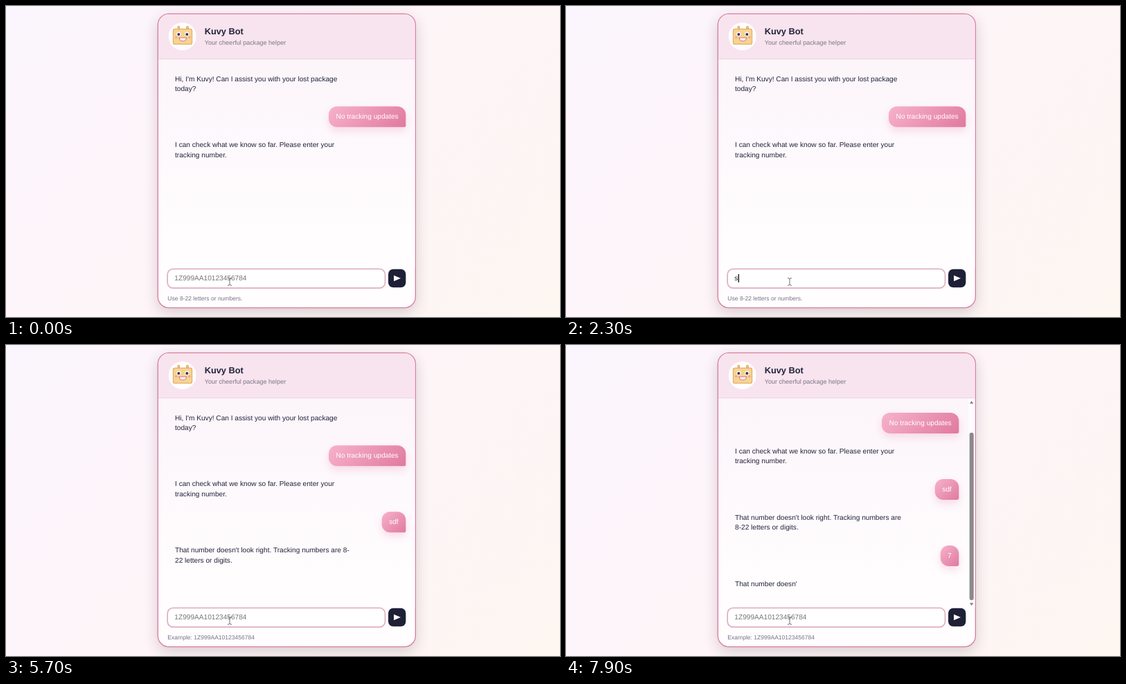
These frames come from a looping animation (800x450 px, 8000 ms). An HTML page:

```html
<!DOCTYPE html>
<html lang="en">
<head>
<meta charset="utf-8">
<title>Package chat</title>
<style>
  html, body { margin: 0; width: 100%; height: 100%; overflow: hidden; }
  body { background: linear-gradient(135deg, #fbf5fd 0%, #fef5f8 50%, #fdf6f1 100%); }
  * { box-sizing: border-box; }

  /* Laid out at 1200 x 675, shown at two thirds. */
  .stage {
    position: absolute; left: 0; top: 0; width: 1200px; height: 675px; overflow: hidden;
    transform: scale(.666667); transform-origin: 0 0;
    font: 15.2px/1.4 "Liberation Sans", Arial, sans-serif;
    color: #23243c; text-rendering: geometricPrecision;
  }
  .card {
    position: absolute; left: 328px; top: 15.6px; width: 560px; height: 640px;
    border: 2px solid #d87f9f; border-radius: 25px; overflow: hidden; background: #fffdfe;
    box-shadow: 0 10px 30px rgba(70, 40, 60, .2);
  }
  .card > * { position: absolute; }

  .head { left: 0; top: 0; width: 100%; height: 98px; background: #f8e4ee; border-bottom: 2px solid #efd3e0; }
  .head > * { position: absolute; }
  .face { left: 22px; top: 18px; width: 60px; height: 60px; }
  .name { left: 100px; top: 25px; font-size: 19.2px; line-height: 27px; font-weight: bold; }
  .role { left: 100px; top: 52px; font-size: 13.6px; line-height: 20px; color: #7b7787; }

  .list {
    left: 0; top: 98px; width: 100%; height: 454px; overflow: hidden;
    background: linear-gradient(#fcf5fa, #fffdfe 85%);
  }
  .thread { display: flex; flex-direction: column; align-items: flex-start; gap: 16px; padding: 20px; }
  .scrolled .thread { padding-right: 35px; }
  .msg { flex: none; padding: 12px 16px; white-space: pre; min-height: 45.28px; }
  .user {
    align-self: flex-end; color: #fff; border-radius: 18px 18px 4px 18px;
    background: linear-gradient(135deg, #f7b2cb, #e07a9f);
    box-shadow: 0 8px 18px rgba(224, 122, 159, .24);
  }
  .dots { display: flex; align-items: center; gap: 6px; height: 56px; }
  .dots i { width: 8px; height: 8px; border-radius: 50%; background: #e08cab; }

  .bar { position: absolute; right: 0; top: 0; width: 15px; height: 454px; background: #fdfbfc; }
  .bar svg { display: block; }

  .field {
    left: 19px; top: 552.4px; width: 473px; height: 43px; padding: 0 14px;
    border: 2px solid #dcacc0; border-radius: 13px; background: #fff; line-height: 39px;
    box-shadow: 0 0 0 1px rgba(216, 127, 159, .3); white-space: pre;
  }
  .caret { position: absolute; top: 10px; width: 1.5px; height: 18px; background: #111; }
  .send { left: 498px; top: 553.4px; width: 38px; height: 40px; border-radius: 11px; background: #1e2037; }
  .hint { left: 20px; top: 607px; font-size: 12.8px; line-height: 20px; color: #78738a; }
  .pointer { left: 147.5px; top: 571px; }
  [hidden] { display: none !important; }
</style>
</head>
<body>
<div class="stage">
  <div class="card">
    <div class="head">
      <svg class="face" viewBox="0 0 60 60">
        <circle cx="30" cy="30" r="30" fill="#fffdfd"/>
        <g stroke="#dda55c" stroke-width="1.5">
          <rect x="20" y="8" width="4" height="8" rx="2" fill="#f3c682"/>
          <rect x="39" y="8" width="4" height="8" rx="2" fill="#f3c682"/>
          <rect x="10" y="14" width="41" height="33" rx="4" fill="#f7d391"/>
        </g>
        <g fill="#fff">
          <circle cx="22" cy="25" r="4.6"/><circle cx="40" cy="25" r="4.6"/>
        </g>
        <g fill="#34345f">
          <circle cx="22" cy="25.5" r="3"/><circle cx="40" cy="25.5" r="3"/>
        </g>
        <g fill="#f2a0a3">
          <circle cx="16.5" cy="32" r="2.5"/><circle cx="45.5" cy="32" r="2.5"/>
        </g>
        <path d="M23 33H39Q38 40 31 40Q24 40 23 33Z" fill="#fff" stroke="#d9707f" stroke-width="1.6"/>
      </svg>
      <div class="name">Kuvy Bot</div>
      <div class="role">Your cheerful package helper</div>
    </div>

    <div class="list" id="list">
      <div class="thread" id="thread">
        <div class="msg">Hi, I'm Kuvy! Can I assist you with your lost package
today?</div>
        <div class="msg user">No tracking updates</div>
        <div class="msg">I can check what we know so far. Please enter your
tracking number.</div>
      </div>
      <div class="bar" id="bar">
        <svg width="15" height="454">
          <path d="M3.5 11L7.5 5.5L11.5 11Z M3.5 444L7.5 449.5L11.5 444Z" fill="#7d7d7d"/>
          <rect x="3" y="74" width="9" height="364" rx="4.5" fill="#8a8a8a"/>
        </svg>
      </div>
    </div>

    <div class="field"><span id="entry"></span><span class="caret" id="caret"></span></div>
    <div class="send">
      <svg width="38" height="40"><path d="M12 13.5L27 20L12 26.5Z" fill="#fff"/></svg>
    </div>
    <div class="hint" id="hint"></div>
    <svg class="pointer" width="13" height="19">
      <path d="M2 1.5Q6 1.5 6.5 4Q7 1.5 11 1.5M6.5 4V15M2 17.5Q6 17.5 6.5 15Q7 17.5 11 17.5"
            fill="none" stroke="#666" stroke-width="1.4"/>
    </svg>
  </div>
</div>

<script>
  const LOOP = 8000, STEP = 100;
  const DOTS_AFTER = 150, REPLY_AFTER = 460, PER_CHAR = 24;
  const SAMPLE = '1Z999AA10123456784';
  const REPLY = ["That number doesn't look right. Tracking numbers are", '8-', '22 letters or digits.'];

  const $ = id => document.getElementById(id);
  const list = $('list'), thread = $('thread'), bar = $('bar');
  const entry = $('entry'), caret = $('caret'), hint = $('hint');

  function addMsg(kind, text = '') {
    const el = document.createElement('div');
    el.className = 'msg ' + kind;
    el.textContent = text;
    thread.append(el);
    return el;
  }

  function addRound(text, keys, sent) {
    const user = addMsg('user', text);
    const dots = addMsg('dots');
    dots.innerHTML = '<i></i><i></i><i></i>';
    return { text, keys, sent, user, dots, reply: addMsg('bot') };
  }

  const rounds = [
    addRound('sdf', [2300, 2400, 2600], 2850),
    addRound('7', [6900], 6995)
  ];

  // One dot hops for 60% of each 1.2 s cycle.
  function hop(age) {
    if (age < 0) return 0;
    const p = age % 1200 / 1200;
    return Math.max(0, 1 - Math.abs(p - .3) / .3);
  }

  function drawRound(r, t, wrapped) {
    const age = t - r.sent;
    const thinking = age >= DOTS_AFTER && age < REPLY_AFTER;
    r.user.hidden = age < 0;
    r.dots.hidden = !thinking;
    r.reply.hidden = age < REPLY_AFTER;
    [...r.dots.children].forEach((dot, i) => {
      const h = hop(age - DOTS_AFTER - i * 200);
      dot.style.transform = `translateY(${-4 * h}px)`;
      dot.style.opacity = .5 + .5 * h;
    });
    const full = REPLY[0] + (wrapped ? '\n' : ' ') + REPLY[1] + (wrapped ? '' : '\n') + REPLY[2];
    r.reply.textContent = full.slice(0, Math.max(0, Math.floor((age - REPLY_AFTER) / PER_CHAR)));
    return thinking;
  }

  function drawField(t) {
    let typed = '', lastEdit = 100;
    for (const r of rounds) {
      const hits = r.keys.filter(k => k <= t);
      if (t >= r.sent) lastEdit = r.sent;
      else if (hits.length) {
        typed = r.text.slice(0, hits.length);
        lastEdit = hits[hits.length - 1];
      }
    }
    entry.textContent = typed || SAMPLE;
    entry.style.color = typed ? '#23243c' : '#757575';
    caret.hidden = t < lastEdit || (t - lastEdit) % 1000 >= 500;
    caret.style.left = 14 + (typed ? entry.offsetWidth : 0) + 'px';
  }

  function draw(t) {
    const scrolled = t >= rounds[1].sent;
    list.classList.toggle('scrolled', scrolled);
    bar.hidden = !scrolled;
    const thinking = rounds.map(r => drawRound(r, t, scrolled))[1];
    const replying = t >= rounds[1].sent + REPLY_AFTER;
    const shift = !scrolled ? 0 : thinking ? 82 : replying ? 71 : 10;
    thread.style.transform = `translateY(${-shift}px)`;
    drawField(t);
    hint.textContent = t < rounds[0].sent ? 'Use 8-22 letters or numbers.' : 'Example: ' + SAMPLE;
  }

  const start = performance.now();
  function tick() {
    const t = (performance.now() - start) % LOOP;
    draw(Math.floor(t / STEP) * STEP);
    requestAnimationFrame(tick);
  }
  tick();
</script>
</body>
</html>
```
